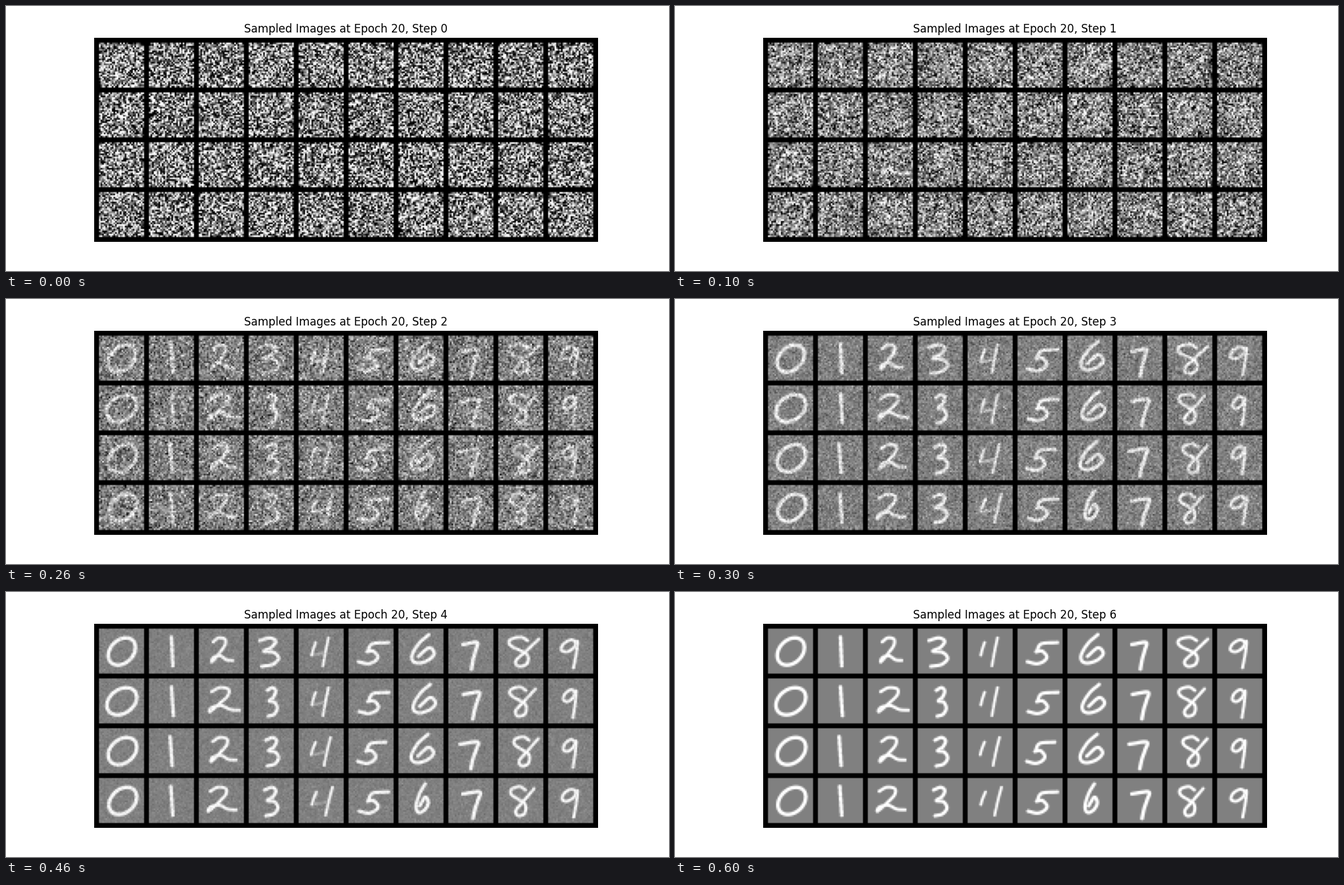
Recreate the animation shown at these times as a matplotlib script. Size 1000x400 px, loop 0.7 s.

```python
import numpy as np
import matplotlib.pyplot as plt
from matplotlib.animation import FuncAnimation

ROWS, COLS, SIZE, PAD, STEPS = 4, 10, 28, 3, 7
PITCH = SIZE + PAD
SCALE = 308 / (ROWS * PITCH + PAD)   # stage pixels per image pixel

shape = (ROWS * PITCH + PAD, COLS * PITCH + PAD)
solid, fading, tiles = (np.zeros(shape) for _ in range(3))
centres = (np.arange(SIZE) + 0.5) * SCALE
GX, GY = np.meshgrid(centres, centres)


def cell(row, col):
    y, x = PAD + row * PITCH, PAD + col * PITCH
    return slice(y, y + SIZE), slice(x, x + SIZE)


def spline(points, n=14):
    """Catmull-Rom curve through the points."""
    p = np.vstack([2 * points[0] - points[1], points, 2 * points[-1] - points[-2]])
    t = np.linspace(0, 1, n)[:, None]
    parts = []
    for a, b, c, d in zip(p, p[1:], p[2:], p[3:]):
        parts.append(b + 0.5 * t * (c - a + t * (2 * a - 5 * b + 4 * c - d
                                                 + t * (3 * (b - c) + d - a))))
    return np.vstack(parts)


def stroke(layer, row, col, points, pen):
    curve = spline(points)
    dist = np.hypot(GX[..., None] - curve[:, 0], GY[..., None] - curve[:, 1]).min(-1)
    area = layer[cell(row, col)]
    np.maximum(area, np.clip((pen + 1.2 - dist) / 2.4, 0, 1), out=area)


def digit(col, pen, spans, *strokes, bar=None):
    """Fit the strokes between the left and right edge given for each row."""
    strokes = [np.array(s, float) for s in strokes]
    xs = np.concatenate(strokes)[:, 0]
    for row, span in enumerate(spans):
        def fit(points):
            return np.column_stack([np.interp(points[:, 0], [xs.min(), xs.max()], span),
                                    points[:, 1]])
        tiles[cell(row, col)] = 1
        for points in strokes:
            stroke(solid, row, col, fit(points), pen)
        if bar:
            stroke(fading, row, col, fit(np.array(bar, float)), pen)


# Points are in stage pixels from the corner of a tile
turn = np.linspace(0, 2 * np.pi, 17)
digit(0, 2.8, [(14, 55), (12, 57), (14, 57), (15, 57)],
      np.column_stack([np.cos(turn), 34.5 - 20.5 * np.sin(turn + 0.3)]))
digit(1, 2.8, [(34, 36), (34, 37), (32, 35), (33, 36)], [(34, 13), (36, 56)])
digit(2, 2.4, [(20, 51), (17, 61), (19, 56), (15, 56)],
      [(21, 20), (31, 14), (42, 16), (42, 25), (33, 36), (19, 50), (21, 44),
       (33, 41), (45, 47), (56, 48)])
digit(3, 2.6, [(17, 45), (28, 43), (26, 45), (24, 44)],
      [(26, 18), (36, 14), (42, 19), (38, 28), (30, 34), (40, 36), (45, 45),
       (39, 54), (28, 57)])
digit(4, 2.1, [(20, 45), (20, 45), (19, 48), (20, 51)],
      [(26, 21), (22, 32), (20, 40)], [(47, 14), (43, 31), (38, 56)],
      bar=[(20, 40), (32, 38), (42, 35)])
digit(5, 2.6, [(15, 60), (16, 61), (14, 56), (16, 60)],
      [(60, 21), (36, 23), (29, 34)],
      [(28, 35), (37, 34), (44, 42), (40, 49), (29, 53), (15, 50)])
digit(6, 2.6, [(21, 54), (23, 56), (20, 53), (27, 45)],
      [(46, 9), (32, 22), (22, 39), (23, 49), (32, 52), (46, 47), (54, 37),
       (46, 29), (31, 42)])
digit(7, 2.8, [(22, 43), (23, 46), (18, 44), (22, 47)],
      [(22, 24), (45, 21), (43, 33), (39, 46), (36, 61)])
digit(8, 2.4, [(18, 61), (19, 56), (25, 60), (20, 54)],
      [(43, 18), (34, 13), (21, 17), (22, 26), (42, 39), (42, 53), (32, 57),
       (28, 49), (41, 34), (57, 16)])
digit(9, 2.3, [(20, 44), (23, 42), (23, 42), (21, 44)],
      [(43, 22), (35, 17), (25, 23), (22, 32), (29, 35), (38, 29), (43, 19),
       (42, 35), (38, 59)])


def picture(step):
    u = step / (STEPS - 1)
    rng = np.random.default_rng(20 + step)
    noise = 0.95 * (1 - u) ** 2.6 * rng.standard_normal(shape)
    ink = np.maximum((1 - (1 - u) ** 2.4) * solid,
                     0.5 * np.sin(np.pi * min(1, 1.2 * u)) * fading)
    return tiles * (np.clip(ink + noise, -1, 1) + 1) / 2


fig, ax = plt.subplots(figsize=(10, 4), dpi=100)
ax.axis("off")
image = ax.imshow(picture(0), cmap="gray", vmin=0, vmax=1)
title = ax.set_title("")


def update(step):
    image.set_data(picture(step))
    title.set_text(f"Sampled Images at Epoch 20, Step {step}")
    return image, title


anim = FuncAnimation(fig, update, frames=STEPS, interval=100, repeat=True)
plt.show()
```
